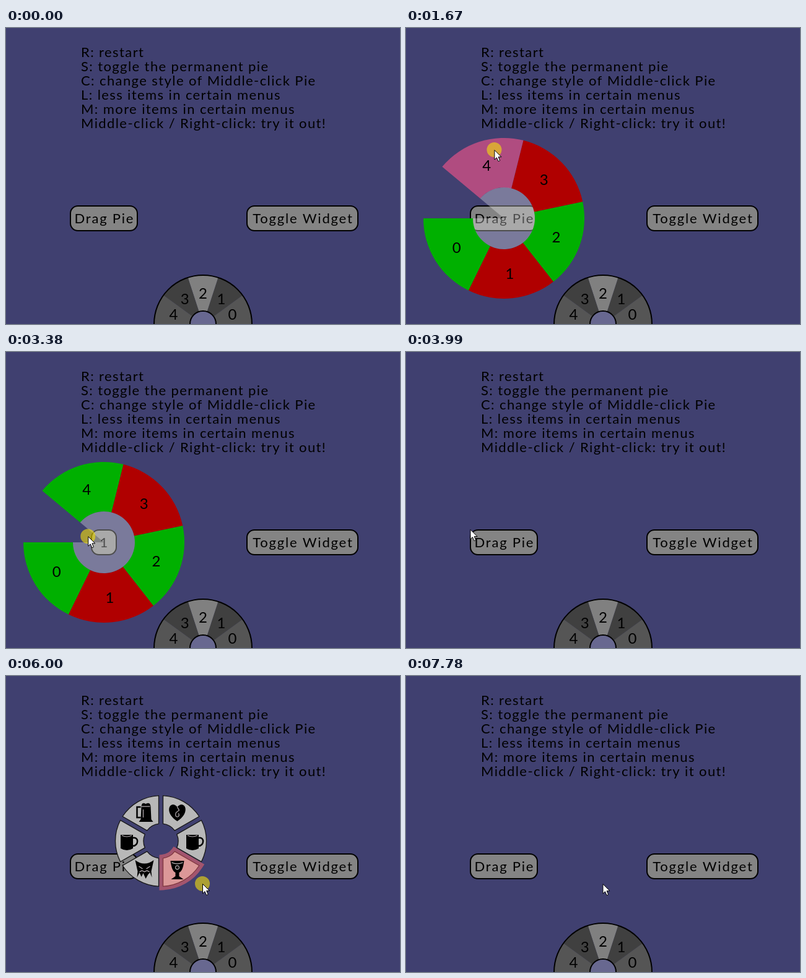
Animation, 636 px wide and 479 px high, one loop 8 s. Source, as an HTML page with a canvas:

```html
<!DOCTYPE html>
<html>
<head>
<meta charset="utf-8">
<style>
html, body { margin: 0; width: 100%; height: 100%; overflow: hidden; background: #404070; }
canvas { display: block; }
</style>
</head>
<body>
<canvas id="stage" width="636" height="479"></canvas>
<script>
const ctx = document.getElementById('stage').getContext('2d');
const RAD = Math.PI / 180, LOOP = 8000;
const HELP = ['R: restart', 'S: toggle the permanent pie', 'C: change style of Middle-click Pie',
  'L: less items in certain menus', 'M: more items in certain menus',
  'Middle-click / Right-click: try it out!'];

function polar(x, y, r, deg) {
  return [x + r * Math.cos(deg * RAD), y + r * Math.sin(deg * RAD)];
}

// cursor moves, each over a span of time
const go = (x, y) => (u, [px, py]) => [px + (x - px) * u, py + (y - py) * u];
const orbit = (x, y, from, to, radius) => u => polar(x, y, radius(u), from + (to - from) * u);
const LEGS = [
  [130, 670, go(158, 308)],
  [1230, 1670, orbit(158, 308, 20, -98, u => 112 * Math.sqrt(u))],
  [1900, 2050, go(158, 308)],
  [2220, 2520, go(155, 365)],
  [2920, 3140, go(158, 308)],
  [3250, 3530, go(103, 287)],
  [3990, 4300, go(250, 266)],
  [5230, 5390, go(308, 315)],
  [5390, 5950, orbit(232, 246, 42, 402, u => 104 - 16 * u)],
  [5950, 6000, go(317, 336)],
  [6420, 7160, orbit(270, 247, 62, 422, u => 101 + 36 * Math.sin(Math.PI * u * u))]
];

function cursorAt(t) {
  let pos = [341, 423];
  for (const [start, end, move] of LEGS)
    if (t >= start) pos = move(Math.min(1, (t - start) / (end - start)), pos);
  return pos;
}

// icons: solid body, dark lines, light lines
const icon = (...paths) => paths.map(p => new Path2D(p));
const HEART = icon('M0 14C-24-2-10-22 0-9C10-22 24-2 0 14Z', '', 'M0-9L3-4L-2 0C-6 9 6 9 2 1');
const MUG = icon('M-12-10H8V12Q-2 18-12 12Z', 'M8-5C18-7 17 8 8 8', 'M-10-9Q-2-5 6-9');
const GOBLET = icon('M-11-14H11Q9 3 3 5V11L10 16H-10L-3 11V5Q-9 3-11-14Z', '',
  'M-9-11Q0-7 9-11M-3-3A3 3 0 1 0 3-3A3 3 0 1 0-3-3');
const DEMON = icon('M-15-15Q0-4 15-15L11 3L12 13L9 5L6 8L2 15L-2 6L-5 12L-8 5L-12 13L-11 3Z', '',
  'M-9-5L-3-1M9-5L3-1M-8 4L-4 2L0 4L4 2L8 4');
const BEER = icon('M-5-10Q-4-18 2-14Q9-18 10-10L11 11L14 15H-9L-6 11Z', 'M-6-9H-12V8H-6', 'M-5-10H9M-2-5V8');
const ICONS = [HEART, MUG, GOBLET, DEMON, MUG, BEER];
const ARROW = new Path2D('M.5 .5V16L4 12.6L6.6 18.6L9.2 17.5L6.7 11.6H11.6Z');

function text(s, x, y, size, spacing, align = 'center') {
  ctx.font = size + 'px Lato, sans-serif';
  ctx.letterSpacing = spacing + 'px';
  ctx.textAlign = align;
  ctx.fillStyle = '#000';
  ctx.fillText(s, x, y);
}

function digit(n, x, y, r, deg) {
  const [lx, ly] = polar(x, y, r, deg);
  text(n, lx, ly + 8.5, 24, 0);
}

// ring sector in degrees, with straight margins of width gap
function sector(x, y, r0, r1, a, b, gap = 0) {
  const g0 = r0 ? Math.asin(gap / r0) : 0, g1 = Math.asin(gap / r1);
  ctx.beginPath();
  ctx.arc(x, y, r1, a * RAD + g1, b * RAD - g1);
  ctx.arc(x, y, r0, b * RAD - g0, a * RAD + g0, true);
  ctx.closePath();
}

function fillSector(color, ...shape) {
  sector(...shape);
  ctx.fillStyle = color;
  ctx.fill();
}

function disc(x, y, r, color) {
  fillSector(color, x, y, 0, r, 0, 360);
}

function stroke(color, width, path) {
  ctx.strokeStyle = color;
  ctx.lineWidth = width;
  path ? ctx.stroke(path) : ctx.stroke();
}

function circle(x, y, r, color, width) {
  ctx.beginPath();
  ctx.arc(x, y, r, 0, 7);
  stroke(color, width);
}

function button(label, x, w) {
  ctx.beginPath();
  ctx.roundRect(x - w / 2, 288, w, 40, 12);
  ctx.fillStyle = '#848484';
  ctx.fill();
  stroke('#000', 2);
  text(label, x + .9, 316, 22, 1.8);
}

function permanentPie() {
  const x = 318, y = 479;
  for (let i = 0; i < 5; i++) {
    const a = -36 * (i + 1);
    fillSector(['#555', '#404040', '#808080'][Math.min(i, 4 - i)], x, y, 21, 79, a, a + 36);
    digit(i, x, y, 50, a + 18);
  }
  disc(x, y, 21, '#686890');
  circle(x, y, 21, '#000', 2);
  circle(x, y, 79, '#000', 2);
}

function dragPie(cur) {
  const x = 158, y = 308, dx = cur[0] - x, dy = cur[1] - y;
  const turn = (540 - Math.atan2(dy, dx) / RAD) % 360;
  const hover = Math.hypot(dx, dy) > 50 ? Math.floor(turn / 64) : -1;
  for (let i = 0; i < 5; i++) {
    const a = 180 - 64 * (i + 1);
    fillSector(i === hover ? '#b04c80' : i % 2 ? '#b00000' : '#00b000', x, y, 50, 130, a, a + 64);
    digit(i, x, y, 90, a + 32);
  }
  fillSector('rgba(255,255,255,.3)', x, y, 0, 50, 220, 540);
}

// silver sectors, two with a pastel rainbow and one in shade
function sheen(x, y) {
  const g = ctx.createConicGradient(-Math.PI / 2, x, y);
  for (let i = 0; i < 6; i++) {
    const rainbow = i % 3 === 2;
    for (let s = 0; s <= 1; s += .25) {
      const light = (i === 3 ? 46 : 72) + 6 * Math.sin(Math.PI * s);
      g.addColorStop((i + s) / 6, `hsl(${rainbow ? 240 - 240 * s : 330},${rainbow ? 27 : 8}%,${light}%)`);
    }
  }
  return g;
}

function shinyDisc(x, y, hover) {
  fillSector(sheen(x, y), x, y, 18, 80, 0, 360);
  if (hover >= 0) fillSector('rgba(195,75,75,.55)', x, y, 27, 80, 60 * hover - 90, 60 * hover - 30);
  for (let a = -90; a < 270; a += 60) {
    ctx.beginPath();
    ctx.moveTo(...polar(x, y, 27, a));
    ctx.lineTo(...polar(x, y, 79, a));
    stroke('#625c66', 2);
  }
  circle(x, y, 22.5, '#a2a0a6', 9);
  circle(x, y, 18.5, '#55555f', 1.3);
  circle(x, y, 20, '#c0bec4', 1.3);
  circle(x, y, 79.3, '#b8aeb6', 1.3);
}

function ringPieces(x, y, hover) {
  for (let i = 0; i < 6; i++) {
    const lit = i === hover;
    sector(x, y, 28, 73.5, 60 * i - 90, 60 * i - 30, 3.5);
    if (lit) stroke('rgba(205,95,110,.7)', 12);
    ctx.fillStyle = lit ? '#dc9898' : '#b8b8b8';
    ctx.fill();
    stroke(lit ? '#803840' : '#181818', 1.3);
  }
}

function iconMenu(cur, shiny, pressed) {
  const x = 250, y = 267, dx = cur[0] - x, dy = cur[1] - y;
  const turn = (Math.atan2(dy, dx) / RAD + 450) % 360;
  const hover = pressed && Math.hypot(dx, dy) > 28 ? Math.floor(turn / 60) : -1;
  (shiny ? shinyDisc : ringPieces)(x, y, hover);
  ICONS.forEach(([body, dark, light], i) => {
    ctx.save();
    ctx.translate(...polar(x, y, 53, 60 * i - 60));
    ctx.fillStyle = '#000';
    ctx.fill(body);
    stroke('#000', 2.5, dark);
    stroke('#b8b0b4', 1.2, light);
    ctx.restore();
  });
}

function pointer([x, y], pressed) {
  if (pressed) disc(x, y, 12, 'rgba(245,225,10,.6)');
  ctx.save();
  ctx.translate(x, y);
  ctx.fillStyle = '#fff';
  ctx.fill(ARROW);
  stroke('#000', 1, ARROW);
  ctx.restore();
}

function draw(t) {
  const within = (a, b) => t >= a && t < b;
  const cur = cursorAt(t);
  const dragging = within(740, 1900) || within(2220, 2920) || within(3240, 3840);
  const pressed = dragging || within(4930, 7780);

  ctx.fillStyle = '#404070';
  ctx.fillRect(0, 0, 636, 479);
  HELP.forEach((line, i) => text(line, 121, 47 + 23 * i, 22, 1.4, 'left'));

  const picked = within(1900, 2920) ? '4' : within(2920, 3840) ? '1' : '';
  button(picked || 'Drag Pie', 158, picked ? 40 : 108);
  button('Toggle Widget', 478.5, 179);
  permanentPie();
  if (dragging) dragPie(cur);
  if (within(4530, 7780)) iconMenu(cur, within(6170, 7320), pressed);
  if (t >= 130) pointer(cur, pressed);
}

function tick() {
  draw(performance.now() % LOOP);
  requestAnimationFrame(tick);
}
tick();
</script>
</body>
</html>
```
